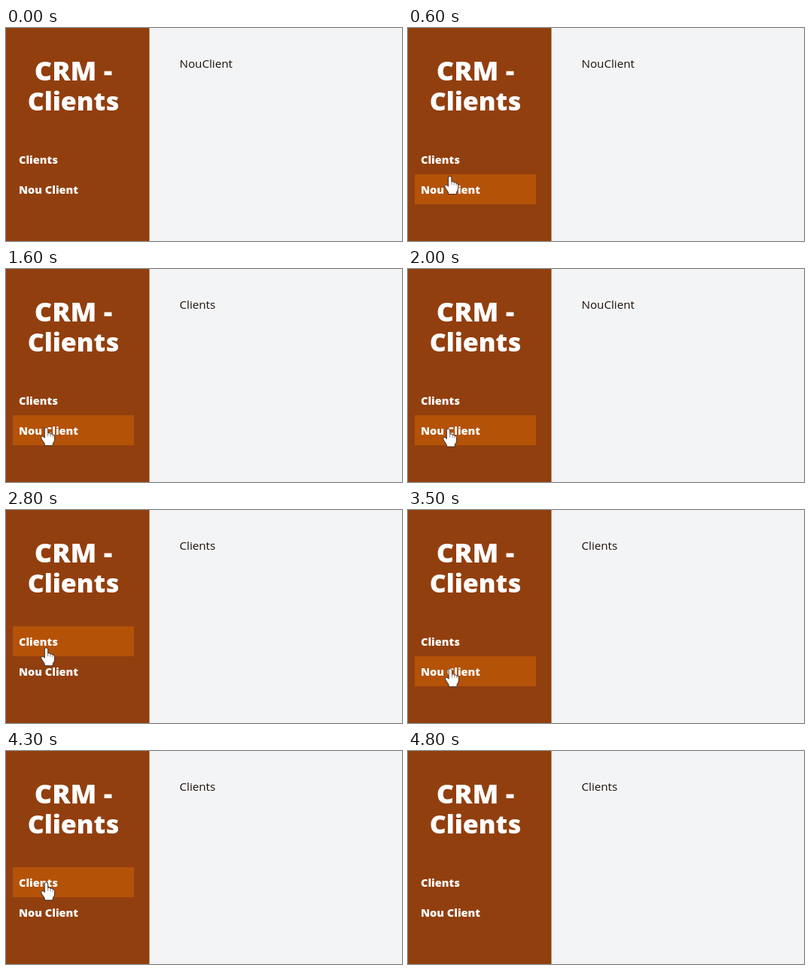
An HTML page with a canvas that plays this animation: 526 by 284 pixels, repeating every 6100 ms.

```html
<!DOCTYPE html>
<html lang="ca">
<head>
<meta charset="utf-8">
<title>CRM - Clients</title>
<style>
  html, body { margin: 0; width: 100%; height: 100%; overflow: hidden; background: #f3f4f6; }
  canvas { display: block; }
</style>
</head>
<body>
<canvas id="stage" width="526" height="284"></canvas>
<script>
const ctx = document.getElementById('stage').getContext('2d');
const LOOP = 6100, STEP = 100;
const ENTER = 400, LEAVE = 4300, GONE = 4800;
const ROW_TOP = 155, ROW_HEIGHT = 40;
const FONT = '"Open Sans", "Noto Sans", sans-serif';

const labels = ['Clients', 'Nou Client'];
const pages = ['NouClient', 'Clients'];

// Each move goes to the other menu row, each click shows the other page
const moves = [1400, 2100, 3400, 4000];
const clicks = [1100, 2000, 2700, 3900, 4300];

const handShape = new Path2D(
  'M-2 2Q-2 0 0 0Q2 0 2 2V7Q4.6 6 5 8Q7.4 7.2 7.8 9Q10 8.6 10 11V15.5' +
  'Q10 18 8 20V23H-2V20.5L-5.7 14.5Q-7 11.5 -5 11Q-3.6 10.8 -2 13Z');
const fingerLines = new Path2D('M2 7V11M5 8V11.5M7.8 9V12');
const arrowShape = new Path2D('M0 0V17L4 13.3L6.6 19.3L9.2 18.2L6.7 12.3H12Z');

// Eases out from 0 to 1
function glide(t, start, length = 300) {
  const k = Math.min(1, Math.max(0, (t - start) / length));
  return 1 - (1 - k) ** 3;
}

function pointerAt(t) {
  if (t < ENTER || t >= GONE) return null;
  const offstage = 1 - glide(t, ENTER, 500) + glide(t, LEAVE, 500);
  const row = moves.reduce((sum, start, i) => sum + (-1) ** i * glide(t, start), 0);
  const drift = glide(t, 2600, 400) - glide(t, moves[3]);
  const aside = glide(t, moves[2]) - glide(t, moves[3]);
  return {
    x: 53.5 + 4 * aside + 10 * offstage,
    y: 175 + 38 * row + 10 * drift + 105 * offstage
  };
}

function text(str, x, y, font, color, align = 'left') {
  ctx.font = `${font} ${FONT}`;
  ctx.fillStyle = color;
  ctx.textAlign = align;
  ctx.fillText(str, x, y);
}

function drawPointer({ x, y }, isHand) {
  const shape = isHand ? handShape : arrowShape;
  ctx.save();
  ctx.translate(x, y);
  if (isHand) ctx.scale(1.1, 1.04);
  ctx.lineJoin = 'round';
  ctx.lineWidth = 0.8;
  ctx.strokeStyle = '#2a1a12';
  ctx.fillStyle = '#fff';
  ctx.fill(shape);
  ctx.stroke(shape);
  if (isHand) {
    ctx.lineWidth = 0.5;
    ctx.stroke(fingerLines);
  }
  ctx.restore();
}

function draw(t) {
  const pointer = pointerAt(t);
  const hovered = pointer ? Math.floor((pointer.y - ROW_TOP) / ROW_HEIGHT) : -1;

  ctx.fillStyle = '#f3f4f6';
  ctx.fillRect(0, 0, 526, 284);
  ctx.fillStyle = '#923f0f';
  ctx.fillRect(0, 0, 190.5, 284);

  text('CRM -', 89.5, 70, '800 36px', '#fff', 'center');
  text('Clients', 89.5, 109.5, '800 34px', '#fff', 'center');

  labels.forEach((label, i) => {
    const y = ROW_TOP + i * ROW_HEIGHT;
    if (i === hovered) {
      ctx.fillStyle = '#b45208';
      ctx.fillRect(9, y, 161, ROW_HEIGHT);
    }
    text(label, 17, y + 26, '800 14.5px', '#fff');
  });

  const page = pages[clicks.filter(c => c <= t).length % 2];
  text(page, 230.5, 53, '400 15.2px', '#1c1008');
  if (pointer) drawPointer(pointer, hovered in labels);
}

function tick() {
  const t = performance.now() % LOOP;
  draw(Math.floor(t / STEP) * STEP);
  requestAnimationFrame(tick);
}
tick();
</script>
</body>
</html>
```
